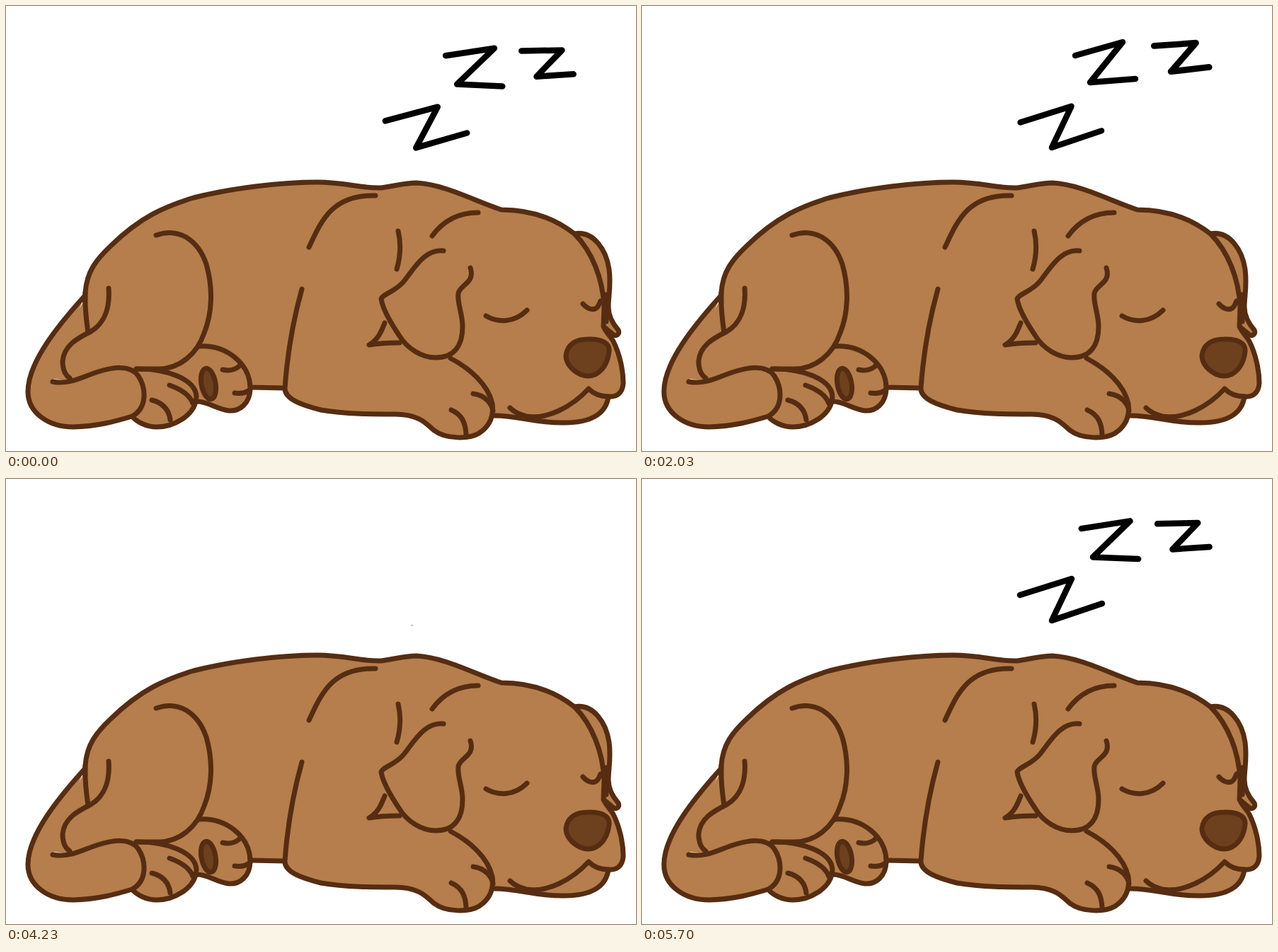
Recreate the animation shown at these times as an HTML page. Size 890 by 629 pixels, loop 5730 ms.

```html
<!DOCTYPE html>
<html lang="en">
<head>
<meta charset="utf-8">
<title>Sleeping dog</title>
<style>
  html, body { margin: 0; width: 100%; height: 100%; overflow: hidden; background: #fff; }
  svg { display: block; width: 100%; height: 100%; }
  path, ellipse { stroke-linecap: round; stroke-linejoin: round; }
  #dog { stroke: #562d12; stroke-width: 7; fill: none; }
  #dog .fur { fill: #b57e4c; }
  #dog .dark { fill: #6d411d; }
  #dog .patch { fill: #b57e4c; stroke: none; }
  #snore { stroke: #000; stroke-width: 8.5; fill: none; }
</style>
</head>
<body>
<svg viewBox="0 0 890 629">
  <g id="dog">
    <!-- far ear -->
    <path class="fur" d="M803 322C830 317 848 345 852 372C855 395 851 410 851 425C851 440 858 450 865 458C868 463 862 469 856 463L844 453"/>
    <!-- back, head and chin -->
    <path class="fur" d="M116 462C113 445 111 425 112 405C114 375 128 358 148 339C190 298 225 283 265 271C320 257 390 249 440 249C480 249 500 258 530 257C550 254 565 250 580 250C620 252 665 277 700 288C740 288 775 300 803 322C828 347 843 385 845 425L844 453C848 462 855 468 858 474C867 492 872 515 872 533C871 548 862 553 851 552C848 574 830 590 785 589C745 589 725 579 690 579"/>
    <path class="patch" d="M108 420L50 525L180 540L270 556L345 539H394L690 579L580 430Z"/>
    <path d="M345 539L394 540M112 405C111 430 114 446 116 462"/>
    <!-- hind feet -->
    <path class="fur" d="M272 481C310 478 345 505 345 540C345 562 330 573 315 572C298 570 285 559 270 559"/>
    <path d="M306 514C318 517 328 512 331 507M323 547C330 548 338 548 345 542"/>
    <ellipse class="dark" cx="286" cy="534" rx="10" ry="22" transform="rotate(-10 286 534)"/>
    <path class="fur" d="M184 513C225 512 268 527 269 552C268 580 235 595 213 595C198 595 185 588 178 580"/>
    <path d="M206 557C222 561 230 570 232 585M231 536C248 542 260 550 264 562"/>
    <!-- tail and thigh -->
    <path class="fur" d="M110 411C75 450 31 503 31 545C31 575 60 595 95 595C130 594 155 587 178 580C200 568 198 540 187 523C175 506 150 511 130 517C110 523 90 536 66 531"/>
    <path d="M145 399C147 425 140 448 120 460C100 470 82 480 80 502C80 515 84 522 90 526"/>
    <path d="M212 324C245 312 272 332 283 365C293 400 291 435 280 462C270 492 245 513 215 513H184"/>
    <!-- foreleg -->
    <path class="fur" d="M418 400C404 450 397 498 394 540C393 556 420 565 445 571C480 577 520 577 550 577C585 577 595 592 605 600C622 613 655 612 668 604C685 593 689 577 687 562C681 535 655 512 628 498"/>
    <path d="M629 571C645 578 649 590 650 605M660 548C677 550 686 562 688 572"/>
    <!-- folds -->
    <path d="M428 341C445 305 460 266 522 268M554 318C558 335 557 355 552 372M602 325C618 303 640 292 667 292"/>
    <!-- near ear -->
    <path d="M535 448C530 460 527 470 513 479C525 477 540 476 556 476"/>
    <path d="M618 346C592 343 577 370 563 388C552 403 532 407 530 414C532 428 545 450 555 465C567 485 588 497 607 497C635 497 645 478 645 453C645 435 637 420 639 406C642 393 663 392 656 370"/>
    <!-- face -->
    <path d="M678 438C695 448 718 448 736 430M815 421C820 427 828 431 834 427C838 424 838 420 840 417M848 408V446"/>
    <path class="dark" d="M822 471C842 470 853 477 852 488C850 508 838 523 822 523C806 522 791 508 791 494C793 478 805 471 822 471Z"/>
    <path d="M851 552C840 552 830 548 823 541C800 566 765 585 735 580C724 577 717 573 712 568"/>
  </g>
  <g id="snore">
    <path d="M-45-36L28-59L0 0L71-24"/>
    <path d="M-21-38L46-57L0 0L64-5"/>
    <path d="M-23-35L34-39L0 0L52-6"/>
  </g>
</svg>
<script>
  const LOOP = 5730, STEPS = 172, CYCLE = 86, START = 41, VISIBLE = 59;
  const paths = document.querySelectorAll("#snore path");

  // Each letter pops in at its home, then drifts and leans a little
  const letters = [
    { x: 579, y: 200, delay: 0, dx: 1, dy: 2, lean: 12.5, from: 44, to: 49, hop: 1 },
    { x: 633, y: 108, delay: 5, dx: 5, dy: 3, lean: 8.6, from: 20, to: 50, hop: 0 },
    { x: 747, y: 93, delay: 7.2, dx: 3, dy: 8, lean: 3.5, from: 20, to: 50, hop: 0 }
  ];

  const progress = (step, from, to) => Math.min(1, Math.max(0, (step - from) / (to - from)));
  const spring = age => 1 - Math.exp(-age / 4.5) * Math.cos(age * Math.PI / 10);
  const bump = (step, peak) => Math.exp(-(((step - peak) / 3.5) ** 2));

  function pose(letter, step) {
    const scale = Math.max(.03, spring(step - letter.delay));
    const drift = progress(step, letter.from, letter.to);
    const hop = letter.hop * (bump(step, 8) + bump(step, 56));
    const x = letter.x + letter.dx * drift + 11 * hop + 6 * (scale - 1);
    const y = letter.y + letter.dy * drift - 8 * hop - 8 * (scale - 1);
    const turn = letter.lean * Math.max(hop, drift);
    return `translate(${x} ${y}) rotate(${turn}) scale(${scale})`;
  }

  function draw(now) {
    const step = (Math.floor((now % LOOP + 4) * STEPS / LOOP) - START + CYCLE) % CYCLE;
    letters.forEach((letter, i) => {
      const visible = step >= letter.delay && step < VISIBLE;
      paths[i].style.display = visible ? "" : "none";
      if (visible) paths[i].setAttribute("transform", pose(letter, step));
    });
  }

  const begin = performance.now();
  function tick() {
    draw(performance.now() - begin);
    requestAnimationFrame(tick);
  }
  tick();
</script>
</body>
</html>
```
